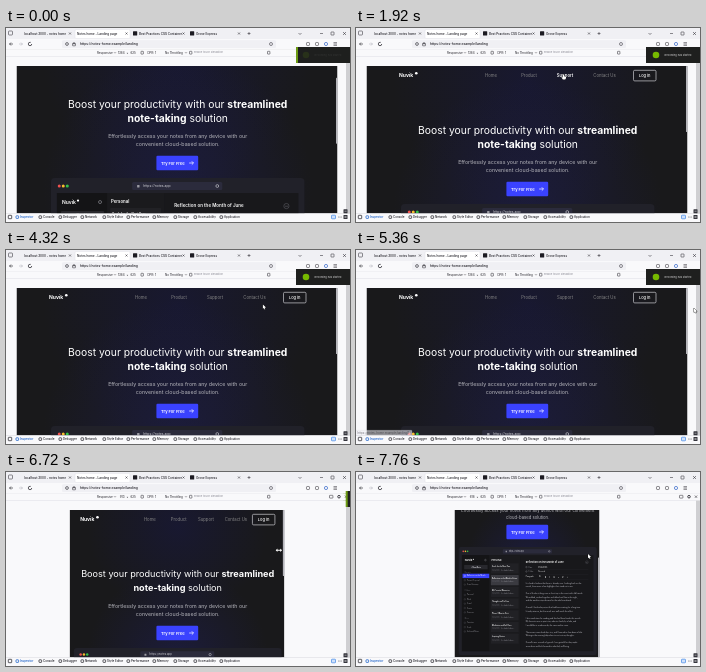
These frames come from a looping animation (344 by 194 pixels, 8 s). An HTML page with a canvas:

```html
<!DOCTYPE html>
<html lang="en">
<head>
<meta charset="utf-8">
<title>Responsive notes page</title>
<style>
html, body { margin: 0; width: 100%; height: 100%; overflow: hidden; background: #f9f9fb; }
canvas { display: block; width: 344px; height: 194px; }
</style>
</head>
<body>
<canvas id="stage"></canvas>
<script>
const W = 344, H = 194, LOOP = 8000, CENTER = 171, MID = 171.7, TOP = 38, BOTTOM = 185.5;
const canvas = document.getElementById('stage');
const ctx = canvas.getContext('2d');
const ratio = window.devicePixelRatio || 1;
canvas.width = W * ratio;
canvas.height = H * ratio;

const clamp = v => Math.max(0, Math.min(1, v));
const lerp = (a, b, k) => a + (b - a) * k;
const ramp = (t, a, b) => clamp((t - a) / (b - a));
const smooth = k => k * k * (3 - 2 * k);
const easeOut = k => 1 - (1 - k) ** 2;

// Values along a list of [time, ...values]
function track(keys, t) {
  if (t <= keys[0][0]) return keys[0].slice(1);
  for (let i = 1; i < keys.length; i++) {
    if (t < keys[i][0]) {
      const a = keys[i - 1], b = keys[i];
      const k = ramp(t, a[0], b[0]);
      return a.slice(1).map((v, j) => lerp(v, b[j + 1], k));
    }
  }
  return keys[keys.length - 1].slice(1);
}

const POINTER = [
  [1360, 220, 64], [1440, 221, 63], [1560, 221, 63], [1760, 214, 54],
  [1920, 207.5, 46.5], [2080, 206, 47], [2400, 172, 47], [2560, 136, 47],
  [2720, 134, 47], [2880, 134, 47], [3060, 172, 47], [3280, 210.5, 47],
  [3520, 248, 47], [3680, 281, 48], [3760, 287, 48], [3920, 288, 48],
  [4080, 284, 56], [4400, 248, 54], [4520, 248, 48], [4800, 250, 48],
  [5100, 287, 48], [5360, 338, 58], [5600, 334, 79], [5920, 335, 79],
  [6260, 335, 79], [6480, 302, 79], [6960, 244, 77.5], [7200, 244, 77.5],
  [7360, 232, 82]
];
const WIDTHS = [[6260, 321], [6320, 312], [6480, 280], [6960, 150], [7040, 145]];
const pointer = t => track(POINTER, t);

const LINKS = [['Home', 135, 7], ['Product', 173, 9], ['Support', 209, 9], ['Contact Us', 248.5, 12], ['Log in', 289, 11]];

function linkAt(t) {
  const [x, y] = pointer(t);
  return y < 43 || y > 53 ? -1 : LINKS.findIndex(l => Math.abs(x - l[1]) < l[2]);
}
function hover(i, t) {
  let n = 0;
  for (let k = 0; k < 5; k++) if (linkAt(t - k * 25) === i) n++;
  return n / 5;
}

function text(s, x, y, size, color, align = 'left', weight = 400) {
  ctx.font = `${weight} ${size}px Inter, Roboto, sans-serif`;
  ctx.textAlign = align;
  ctx.textBaseline = 'middle';
  ctx.fillStyle = color;
  ctx.fillText(s, x, y);
}
// Centred line made of [string, weight] runs
function runs(parts, y, size, color) {
  const widths = parts.map(([s, w]) => {
    ctx.font = `${w} ${size}px Inter, Roboto, sans-serif`;
    return ctx.measureText(s).width;
  });
  let x = MID - widths.reduce((a, b) => a + b) / 2;
  parts.forEach(([s, w], i) => { text(s, x, y, size, color, 'left', w); x += widths[i]; });
}
function rect(x, y, w, h, color) {
  ctx.fillStyle = color;
  ctx.fillRect(x, y, w, h);
}
function box(x, y, w, h, r, fill, stroke, lw = 0.5) {
  ctx.beginPath();
  ctx.roundRect(x, y, w, h, r);
  if (fill) { ctx.fillStyle = fill; ctx.fill(); }
  if (stroke) { ctx.strokeStyle = stroke; ctx.lineWidth = lw; ctx.stroke(); }
}
function dot(x, y, r, color) {
  ctx.fillStyle = color;
  ctx.beginPath();
  ctx.arc(x, y, r, 0, 7);
  ctx.fill();
}
function ring(x, y, r, color, lw = 0.6, end = 6.3) {
  ctx.strokeStyle = color;
  ctx.lineWidth = lw;
  ctx.beginPath();
  ctx.arc(x, y, r, 0, end);
  ctx.stroke();
}
function line(color, lw, ...p) {
  ctx.strokeStyle = color;
  ctx.lineWidth = lw;
  ctx.beginPath();
  for (let i = 0; i < p.length; i += 2) ctx.lineTo(p[i], p[i + 1]);
  ctx.stroke();
}
function cross(x, y, r, color) {
  line(color, 0.5, x - r, y - r, x + r, y + r);
  line(color, 0.5, x + r, y - r, x - r, y + r);
}

const INK = '#1c1b22';

function tab(s, x, closeX, icon) {
  if (icon) box(x - 6, 3.3, 4.2, 4.2, 0.5, INK);
  text(s, x, 5.6, 3.05, INK, 'left', 500);
  cross(closeX, 5.5, 1, INK);
}

function browserTop(w) {
  rect(0, 0, W, 11, '#f0f0f4');
  rect(0, 11, W, 10.5, '#f9f9fb');
  box(2.5, 3, 4, 4, 0.8, null, INK);
  box(69, 1.5, 55, 9, 1.2, '#fff', '#dcdce2', 0.4);
  tab('localhost:3000 - notes home', 18, 64);
  tab('Notes home - Landing page', 71, 120.5);
  tab('Best Practices CSS Container', 133, 177.5, true);
  tab('Grove Express', 190, 233, true);
  line(INK, 0.5, 241.5, 5.5, 244.5, 5.5);
  line(INK, 0.5, 243, 4, 243, 7);
  line(INK, 0.5, 292.5, 5, 294, 6.5, 295.5, 5);
  line(INK, 0.5, 314, 5.5, 317, 5.5);
  box(325, 4, 3, 3, 0.3, null, INK);
  cross(338.5, 5.5, 1.5, INK);

  line(INK, 0.6, 7, 16, 3.5, 16);
  line(INK, 0.6, 5, 14.5, 3.5, 16, 5, 17.5);
  line('#b4b4bc', 0.6, 13, 16, 16.5, 16);
  line('#b4b4bc', 0.6, 15, 14.5, 16.5, 16, 15, 17.5);
  ring(24, 16, 1.7, INK, 0.7, 5.2);
  box(56, 12.3, 214, 7.6, 1.2, '#f0f0f4');
  ring(61, 16, 1.4, INK, 0.6);
  box(66.5, 15.5, 3, 2.3, 0.4, null, INK);
  ring(68, 15.3, 0.9, INK, 0.4);
  text('https://notes-home.example/landing', 74, 16.2, 3.3, INK, 'left', 500);
  ring(265, 16, 1.5, INK, 0.5);
  [302, 311].forEach(x => box(x - 1.5, 14.5, 3, 3, 0.7, null, INK));
  ring(320, 16, 1.6, '#3264c8', 0.7);
  [-1.4, 0, 1.4].forEach(d => line(INK, 0.5, 327.5, 16 + d, 331, 16 + d));

  const y = 24.7;
  rect(0, 21.2, W, 0.4, '#dcdce2');
  rect(0, 21.6, W, 7, '#f9f9fb');
  rect(0, 28.3, W, 0.4, '#dcdce2');
  text('Responsive', 91, y, 2.9, INK);
  text(String(Math.round(w * 4.25)), 118.5, y, 2.9, INK, 'right');
  text('×', 121.5, y, 2.9, INK, 'center');
  text('625', 124.5, y, 2.9, INK);
  text('DPR: 1', 141.5, y, 2.9, INK);
  text('No Throttling', 159, y, 2.9, INK);
  text('Enable touch simulation', 188, y, 2.6, '#8a8a94');
  [109, 180].forEach(x => line(INK, 0.4, x - 1, y - 0.5, x, y + 0.5, x + 1, y - 0.5));
  [135, 183.5, 261.5].forEach(x => box(x, y - 1.4, 2.4, 2.8, 0.4, null, INK));
  box(323.5, y - 1.4, 3.4, 2.8, 0.4, null, INK);
  ring(333, y, 1.3, INK, 0.8);
  cross(340, y, 1.2, INK);
}

function browserBottom() {
  rect(0, 185.5, W, 8.5, '#f9f9fb');
  rect(0, 185.4, W, 0.4, '#d4d4da');
  box(2.3, 187.3, 3.4, 3.4, 0.5, null, INK, 0.7);
  const tools = [['Inspector', 10], ['Console', 33], ['Debugger', 53], ['Network', 75], ['Style Editor', 97],
    ['Performance', 121], ['Memory', 147], ['Storage', 168], ['Accessibility', 188], ['Application', 214]];
  tools.forEach(([s, x], i) => {
    const c = i ? INK : '#0a55c4';
    box(x, 187.8, 2.6, 2.6, 0.5, null, c, 0.7);
    text(s, x + 4, 189.3, 2.95, c, 'left', 500);
  });
  box(325.5, 187.2, 4, 3.6, 0.6, '#cfe0fa', '#0060df');
  [-1, 0, 1].forEach(d => dot(334 + d * 1.2, 189, 0.4, INK));
  rect(340, 28.7, 4, 156.7, '#cfcfd2');
  box(337.5, 181.2, 4, 4, 0.5, '#34343c');
  line('#fff', 0.5, 338.5, 183.2, 340.6, 183.2);
  box(337.5, 187, 4, 4, 0.5, '#34343c');
  cross(339.5, 189, 1, '#fff');
}

const PARAGRAPHS = [
  ['It is hard to believe that June is already over. Looking back on the', 'month, there were a few highlights that stand out to me.'],
  ['One of the best things was a short trip to the coast with old friends.', 'We walked, cooked together and talked until late in the night,', 'and the weather stayed warm for the whole weekend.'],
  ['At work I finished a project that had been waiting for a long time.', 'It took patience, but the result was well worth the effort.'],
  ['I also made time for reading and finished three books this month.', 'My favourite was a quiet story about a family by a lake, and', 'I would like to read more by the same author soon.'],
  ['There were some hard days too, and I learned to slow down a little.', 'Writing in the evening helped me to sort out my thoughts.'],
  ['Overall it was a month of growth. I am grateful for the people', 'around me and look forward to what July will bring.']
];
const CARDS = ['Goals for the Next Year', 'Reflection on the Month of June', 'My Favorite Memories', 'Thoughts on Pet Care',
  'Places I Want to Visit', 'Meditation and Self Care', 'Inspiring Quotes'];
const ROWS = ['Reflection on the Month', 'Project Proposal', 'Travel Itinerary', 'Folders', 'Personal', 'Work', 'Travel',
  'Events', 'Finances', 'More', 'Favorites', 'Trash', 'Archived Notes'];

// App preview, drawn in units of its widest size, 253 by 198
function preview(x, y, scale) {
  const grey = '#9a9aa2', soft = '#66666e';
  ctx.save();
  ctx.translate(x, y);
  ctx.scale(scale, scale);
  box(0, 0, 253, 198, 4, '#212129');
  ['#f0524f', '#f5bd2e', '#35c048'].forEach((c, i) => dot(8.3 + i * 4, 8, 1.5, c));
  box(81, 4, 90, 8, 1.5, '#2b2b3c');
  box(86, 7, 2.4, 2.4, 0.3, grey);
  text('https://notes.app', 92, 8.1, 3.4, '#d0d0d6');
  ring(166, 8, 1.4, '#c0c0c8', 0.7);
  rect(6, 15, 241, 176, '#18181b');
  rect(6, 15, 50, 176, '#141416');
  rect(56, 15, 57, 176, '#1a1a1d');

  text('Nuvik', 11, 24, 5, '#fff', 'left', 600);
  dot(27, 22.5, 1.1, '#fff');
  ring(49, 24, 1.5, grey);
  box(10, 33, 43, 8, 1, '#28282d');
  text('+ New Note', 31.5, 37.2, 3.2, '#e4e4ea', 'center', 600);
  text('Recents', 11, 46, 2.8, soft);
  rect(7, 49, 49, 8, '#3a42ff');
  ROWS.forEach((s, i) => {
    const label = s === 'Folders' || s === 'More';
    const ry = 53 + i * 8 + (i > 2 ? 3 : 0) + (i > 8 ? 3 : 0);
    if (!label) box(10, ry - 1.3, 2.4, 2.4, 0.4, null, i ? soft : '#fff');
    text(s, label ? 11 : 15, ry, 3, i ? (label ? soft : grey) : '#fff');
  });

  text('Personal', 60, 24, 4.3, '#fff', 'left', 600);
  CARDS.forEach((s, i) => {
    const cy = 30 + i * 21.5;
    box(59, cy, 51, 18.5, 1, i === 1 ? '#3a3a40' : '#212125');
    text(s, 61, cy + 6, 3, '#fff', 'left', 600);
    text('21/06/2023', 61, cy + 12.5, 2.5, soft);
    text('It is hard to believe...', 78, cy + 12.5, 2.5, grey);
  });

  text('Reflection on the Month of June', 123, 28, 4.5, '#fff', 'left', 600);
  ring(235, 28, 2.6, soft, 0.5);
  [-1, 0, 1].forEach(d => dot(235 + d, 28, 0.35, grey));
  [['Date', '21/06/2023'], ['Folder', 'Personal']].forEach(([a, b], i) => {
    box(123, 35.7 + i * 8, 2.4, 2.4, 0.4, null, grey);
    text(a, 128, 37 + i * 8, 3, grey);
    text(b, 146, 37 + i * 8, 3, '#fff');
  });
  [41, 49.5, 60].forEach(ry => rect(123, ry, 115, 0.4, '#2c2c33'));
  text('Paragraph', 123, 55, 3, '#fff');
  text('16', 147, 55, 3, '#fff');
  ['B', 'I', 'U', '=', '#', '+'].forEach((s, i) => text(s, 158 + i * 8, 55, 3.2, '#fff', 'left', 600));
  let ty = 66;
  PARAGRAPHS.forEach(p => {
    p.forEach(s => { text(s, 123, ty, 3.3, '#c8c8d0'); ty += 6.6; });
    ty += 6;
  });
  ctx.restore();
}

function ctaButton(y) {
  box(150.4, y - 7.2, 41.8, 14.4, 1.2, '#3a42ff');
  text('Try For Free', 155, y + 0.3, 4.1, '#fff', 'left', 600);
  line('#fff', 0.7, 183.2, y, 187.4, y);
  line('#fff', 0.7, 185.8, y - 1.7, 187.5, y, 185.8, y + 1.7);
}

function desktopPage(w, t) {
  const half = Math.min(128.5, w / 2 - 10), k = half / 128.5;
  const at = x => MID + (x - MID) * k;
  text('Nuvik', at(43), 47.3, 5, '#fff', 'left', 700);
  dot(at(43) + 17.3, 45.3, 1.3, '#fff');
  LINKS.slice(0, 4).forEach(([s, x], i) => {
    const h = hover(i, t), c = Math.round(lerp(134, 255, h));
    text(s, at(x), 47.7, 4.25, `rgb(${c},${c},${c})`, 'center', h > 0.5 ? 600 : 400);
  });
  const h = hover(4, t), c = Math.round(lerp(255, 20, h)), bx = at(300) - 22.5;
  box(bx, 42.3, 22.5, 10.6, 1.2, `rgba(255,255,255,${h})`, '#e8e8ec', 0.6);
  text('Log in', bx + 11.2, 47.9, 4, `rgb(${c},${c},${c})`, 'center', 500);

  const big = 10.35 * Math.min(1, (w - 12) / 230), small = 5.32;
  runs([['Boost your productivity with our ', 400], ['streamlined', 700]], 102.7, big, '#fff');
  runs([['note-taking', 700], [' solution', 400]], 116.7, big, '#fff');
  text('Effortlessly access your notes from any device with our', MID, 134.8, small, '#b8b8be', 'center');
  text('convenient cloud-based solution.', MID, 142.8, small, '#b8b8be', 'center');
  ctaButton(161);
  const mw = Math.min(253.5, w - 7);
  preview(MID - mw / 2, 176, mw / 253);
}

function mobilePage(w) {
  const left = CENTER - w / 2, right = CENTER + w / 2;
  text('Nuvik', left + 4, 45, 3.2, '#fff', 'left', 600);
  dot(left + 14.5, 43.6, 0.8, '#fff');
  [-2, 0, 2].forEach(d => line('#fff', 0.8, right - 9.5, 44.7 + d, right - 3.5, 44.7 + d));
  runs([['Boost your productivity with our', 400]], 95.4, 7.75, '#fff');
  runs([['streamlined note-taking', 700], [' solution', 400]], 104.4, 7.75, '#fff');
  text('Effortlessly access your notes from any device with our convenient', MID, 116, 4.22, '#b8b8be', 'center');
  text('cloud-based solution.', MID, 122.4, 4.22, '#b8b8be', 'center');
  ctaButton(137);
  const mw = w - 7;
  preview(MID - mw / 2, 152, mw / 253);
}

function page(t, w, scroll) {
  const x = CENTER - w / 2, view = BOTTOM - TOP, wide = w > 190;
  rect(0, 28.7, 340, 156.8, '#f9f9fb');
  ctx.save();
  ctx.beginPath();
  ctx.rect(x, TOP, w, view);
  ctx.clip();
  rect(x, TOP, w, view, '#19191b');
  ctx.translate(0, -scroll);
  [[55, '24,24,66'], [wide ? 185 : 165, '30,30,84']].forEach(([y, c]) => {
    const g = ctx.createRadialGradient(MID, y, 0, MID, y, w * 0.42);
    g.addColorStop(0, `rgba(${c},.55)`);
    g.addColorStop(1, `rgba(${c},0)`);
    rect(x, TOP, w, 260, g);
  });
  if (wide) desktopPage(w, t); else mobilePage(w);
  ctx.restore();
  const thumb = wide ? 66 : 100, rate = wide ? 0.45 : 0.65;
  const y = Math.min(TOP + scroll * rate, BOTTOM - thumb);
  box(x + w - 1.5, y, 1.5, thumb, 0.6, '#b6b6bc');
}

function statusBar(t) {
  const a = ramp(t, 2000, 2080) * (1 - ramp(t, 4020, 4120)) + ramp(t, 4560, 4640) * (1 - ramp(t, 5240, 5520));
  if (a <= 0) return;
  ctx.globalAlpha = a;
  box(-1, 180.3, 57, 5.4, 0.8, '#f0f0f4', '#c8c8d0', 0.4);
  text('https://notes-home.example/landing#', 1.5, 183.2, 2.9, INK);
  ctx.globalAlpha = 1;
}

function notice(t) {
  const out = easeOut(ramp(t, 6520, 6800));
  if (out >= 1) return;
  const x = 290 + 54 * out;
  const strip = 2 * (1 - ramp(t, 80, 320)) + 2 * ramp(t, 6320, 6440);
  rect(x, 19, W - x, 16, '#6c9a12');
  rect(x + strip, 19, W - x, 16, '#1e1f1e');
  ctx.globalAlpha = lerp(0.12, 1, ramp(t, 60, 480)) * (1 - ramp(t, 6300, 6440));
  dot(300, 27, 3.3, '#76b900');
  text('Recording has started', 308.5, 27.2, 2.6, '#d8d8d8');
  ctx.globalAlpha = 1;
}

function shape(x, y, pts) {
  ctx.beginPath();
  for (let i = 0; i < pts.length; i += 2) ctx.lineTo(x + pts[i], y + pts[i + 1]);
  ctx.closePath();
  ctx.lineJoin = 'round';
  ctx.lineWidth = 0.7;
  ctx.strokeStyle = '#111';
  ctx.stroke();
  ctx.fillStyle = '#fff';
  ctx.fill();
}
function drawPointer(t) {
  if (t < 1040) return;
  const [x, y] = pointer(t);
  if (t > 5580 && t < 7220) {
    shape(x, y, [-3.2, 0, -1.4, -1.8, -1.4, -0.5, 1.4, -0.5, 1.4, -1.8, 3.2, 0, 1.4, 1.8, 1.4, 0.5, -1.4, 0.5, -1.4, 1.8]);
  } else if (linkAt(t) >= 0) {
    shape(x, y, [-0.5, 0, 0.5, 0, 0.6, 1.7, 2.6, 2.2, 2.4, 4, 1.7, 5, -0.6, 5, -2, 3, -1.6, 2.5, -0.5, 3.1]);
  } else {
    shape(x, y, [0, 0, 0, 4.3, 1, 3.5, 1.7, 5, 2.4, 4.7, 1.8, 3.2, 3.1, 3.1]);
  }
}

function draw(t) {
  ctx.setTransform(ratio, 0, 0, ratio, 0, 0);
  ctx.globalAlpha = 1;
  const w = track(WIDTHS, t)[0];
  const scroll = t < 4000 ? 26 * (1 - smooth(ramp(t, 60, 800))) : 77 * smooth(ramp(t, 7220, 7760));
  page(t, w, scroll);
  statusBar(t);
  browserTop(w);
  browserBottom();
  notice(t);
  drawPointer(t);
}

const start = performance.now();
function tick() {
  draw((performance.now() - start) % LOOP);
  requestAnimationFrame(tick);
}
tick();
</script>
</body>
</html>
```
